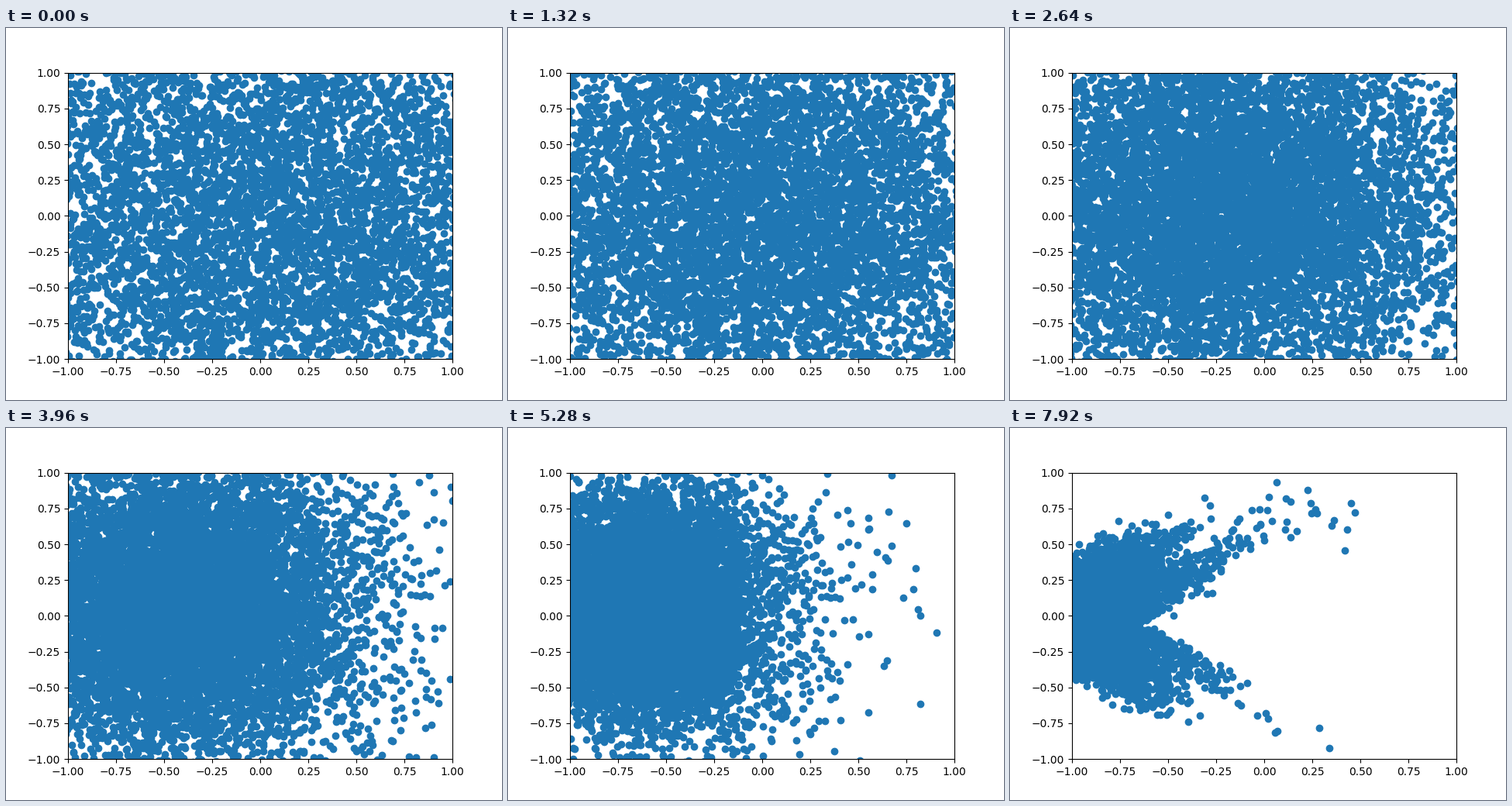
A matplotlib script for the animation above (8 s loop, 640x480 px).

```python
import numpy as np
import matplotlib.pyplot as plt
from matplotlib.animation import FuncAnimation

N = 10000
TICK = 40      # ms per drawn frame
HOLD = 330     # ms each step of the cloud stays
LOOP = 8000
LAST = LOOP // HOLD

rng = np.random.default_rng(7)
gx, gy, noise = rng.standard_normal((3, N))
upper = gy > -0.3
tail = np.clip(gx - 1.5, 0, None) ** 1.5 * np.where(upper, 1, 0.5)


def cloud(step):
    """Positions of all particles after the given number of steps."""
    u = step / LAST
    ease = u * u * (3 - 2 * u)

    # the cloud shrinks, drifts left and bends into a crescent
    lag = 2.8 * u**4 * tail
    y = 0.06 * np.sin(np.pi * u) + np.exp(-1.55 * u**1.3) * gy
    x = -0.88 * ease + np.exp(-1.95 * u**1.4) * (gx + lag) + 0.9 * u**4 * y**2

    # stragglers on the right gather into an upper and a lower arm
    arm = np.where(upper, 0.45 + 0.06 * lag, -0.5 - 0.1 * lag) + 0.12 * noise
    pull = u**3 * np.clip(lag / 3.5, 0, 1)
    return np.column_stack([x, y + pull * (arm - y)])


fig, ax = plt.subplots(figsize=(6.4, 4.8), dpi=100)
ax.set_xlim(-1, 1)
ax.set_ylim(-1, 1)
dots = ax.scatter(gx, gy, color="C0")


def update(frame):
    dots.set_offsets(cloud(frame * TICK // HOLD))
    return (dots,)


anim = FuncAnimation(fig, update, frames=LOOP // TICK, interval=TICK,
                     repeat=True, repeat_delay=0)
plt.show()
```
